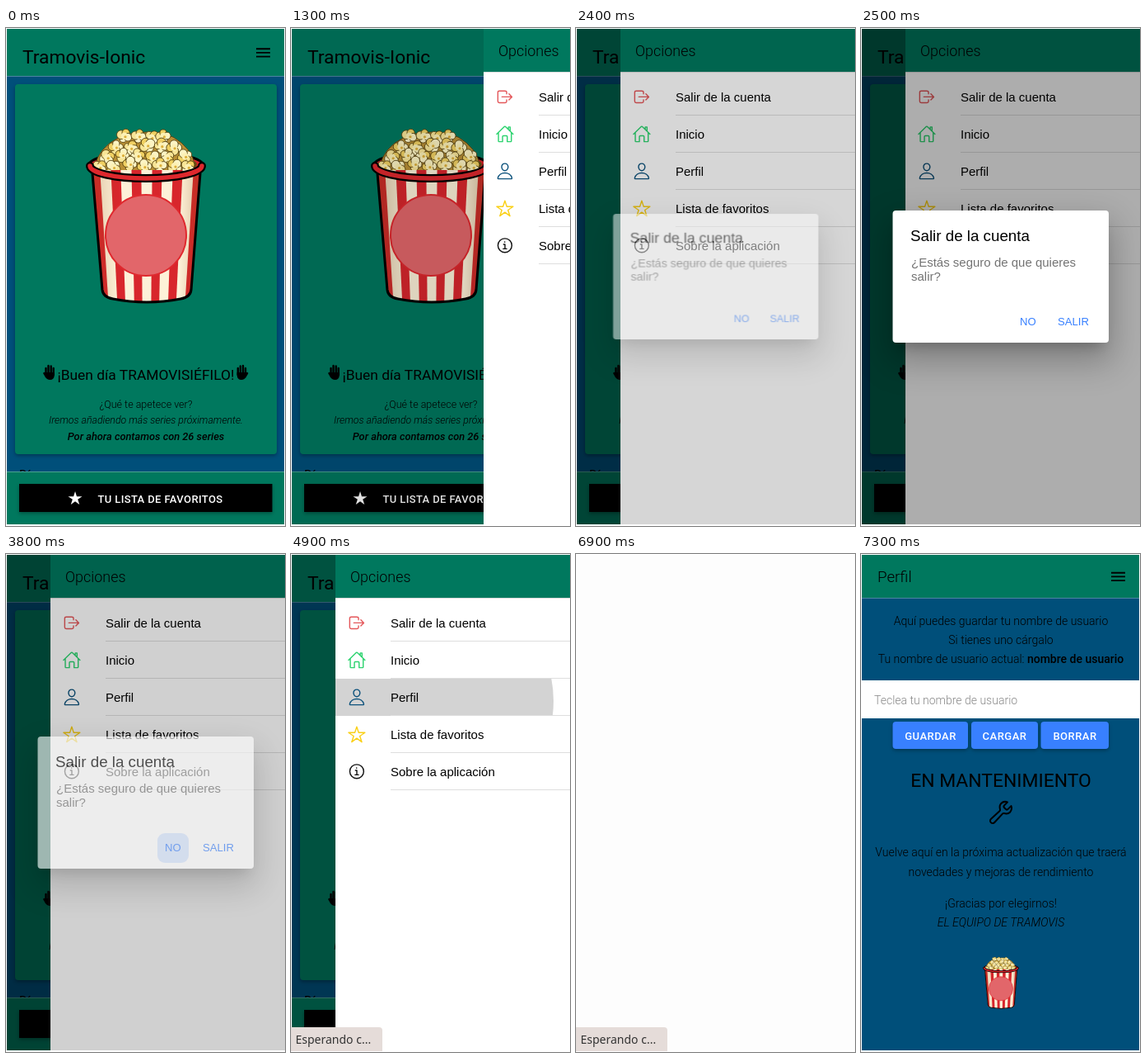
Recreate the animation shown at these times as an HTML page. Size 339 px wide and 603 px high, loop 8000 ms.

```html
<!DOCTYPE html>
<html lang="es">
<head>
<meta charset="utf-8">
<title>Menú lateral</title>
<style>
html, body { margin: 0; width: 100%; height: 100%; overflow: hidden; background: #fff; }
svg { display: block; }
text { font-family: Roboto, "Open Sans", sans-serif; }
.ui text { font-family: "Liberation Sans", Arial, sans-serif; }
.mid { text-anchor: middle; }
.copy { font-size: 14px; font-weight: 300; }
.btn { font-size: 13px; font-weight: 500; letter-spacing: .5px; fill: #fff; }
.icon { fill: none; stroke-width: 32; stroke-linecap: round; stroke-linejoin: round; }
.raised { filter: drop-shadow(0 2px 2px rgba(0, 0, 0, .3)); }
.green { fill: #00785e; }
.blue { fill: #004f7a; }
.edge { fill: #fff; opacity: .3; }

.menu, .dim, .alert, .alertDim, .tap, .ripple, .blank, .profile, .status {
  animation: 8s step-end infinite;
}
.menu { animation-name: menu; }
.dim { animation-name: dim; }
.alert { animation-name: alert; transform-origin: 170px 301px; }
.alertDim { animation-name: alertDim; }
.tap { animation-name: tap; }
.ripple { animation-name: ripple; }
.blank { animation-name: blank; }
.profile { animation-name: profile; }
.status { animation-name: status; }

@keyframes menu {
  0% { transform: translateX(300px); }
  16.25% { transform: translateX(180px); }
  17.5% { transform: translateX(57px); }
  18.75% { transform: translateX(6px); }
  20%, 100% { transform: none; }
}
@keyframes dim {
  0% { opacity: 0; }
  16.25% { opacity: .12; }
  17.5% { opacity: .26; }
  18.75% { opacity: .31; }
  20%, 100% { opacity: .32; }
}
@keyframes alert {
  0% { opacity: 0; transform: scale(.9); }
  30% { opacity: .5; transform: scale(.95); }
  31.25% { opacity: 1; transform: none; }
  47.5% { opacity: .62; transform: none; }
  48.75%, 100% { opacity: 0; transform: none; }
}
@keyframes alertDim {
  0% { opacity: 0; }
  30% { opacity: .16; }
  31.25% { opacity: .32; }
  47.5% { opacity: .185; }
  48.75%, 100% { opacity: 0; }
}
@keyframes tap {
  0% { opacity: 0; }
  47.5%, 100% { opacity: .2; }
}
@keyframes ripple {
  0% { r: 0; }
  61.25% { r: 139px; }
  62.5%, 100% { r: 200px; }
}
@keyframes blank {
  0% { opacity: 0; }
  70%, 100% { opacity: 1; }
}
@keyframes profile {
  0% { opacity: 0; transform: none; }
  90% { opacity: .6; transform: translateY(8px); }
  91.25%, 100% { opacity: 1; transform: none; }
}
@keyframes status {
  0% { opacity: 0; }
  61.25% { opacity: 1; }
  78.75% { opacity: .75; }
  80% { opacity: .5; }
  81.25% { opacity: .25; }
  82.5% { opacity: 0; }
  86.25% { opacity: 1; }
  91.25%, 100% { opacity: 0; }
}
</style>
</head>
<body>
<svg width="339" height="603" viewBox="0 0 339 603">
  <defs>
    <clipPath id="screen"><rect x="1" y="1" width="338" height="600"/></clipPath>
    <clipPath id="page"><rect x="1" y="1" width="337" height="600"/></clipPath>
    <clipPath id="row"><rect x="54" y="151" width="285" height="45"/></clipPath>
    <clipPath id="cup"><path d="M104 172L117 317Q118 326 130 328Q171 336 212 328Q224 326 225 317L237 172Z"/></clipPath>
    <linearGradient id="shade">
      <stop offset="0" stop-color="#8a4a10" stop-opacity=".25"/>
      <stop offset=".25" stop-color="#8a4a10" stop-opacity="0"/>
      <stop offset=".8" stop-color="#8a4a10" stop-opacity="0"/>
      <stop offset="1" stop-color="#8a4a10" stop-opacity=".3"/>
    </linearGradient>
    <filter id="soft" x="-30%" y="-50%" width="160%" height="200%"><feGaussianBlur stdDeviation="7.5"/></filter>
    <filter id="softer" x="-30%" y="-50%" width="160%" height="200%"><feGaussianBlur stdDeviation="20"/></filter>

    <path id="star" d="M480 208H308L256 48l-52 160H32l140 96-54 160 138-100 138 100-54-160z"/>
    <path id="burger" d="M0 0h17M0 4.7h17M0 9.4h17" stroke="#000" stroke-width="1.9" fill="none"/>
    <g id="hand" stroke="#000" stroke-linecap="round" fill="none">
      <path d="M-4 -5V2M-1 -8V2M2.2 -7.5V2M5.2 -5V3" stroke-width="2.4"/>
      <path d="M-6 1L-3.5 5" stroke-width="2.6"/>
      <path d="M-5.2 0H6.4V3Q6 9 1 9Q-3 9 -5 5Z" fill="#000" stroke="none"/>
    </g>

    <g id="tub">
      <ellipse cx="170" cy="167" rx="70" ry="17" fill="#d8232a" stroke="#000" stroke-width="3"/>
      <ellipse cx="170" cy="165" rx="62" ry="12" fill="#6b4a12"/>
      <g id="corn" stroke="#54400f" stroke-width=".9"></g>
      <g clip-path="url(#cup)">
        <rect x="100" y="165" width="140" height="170" fill="#fdf1d8"/>
        <g id="stripes" fill="#d8262c"></g>
        <rect x="104" y="165" width="133" height="170" fill="url(#shade)"/>
      </g>
      <path d="M105 176L117 317Q118 326 130 328Q171 336 212 328Q224 326 225 317L236 176" fill="none" stroke="#000" stroke-width="3"/>
      <path d="M102 167A68 15 0 0 0 238 167" fill="none" stroke="#000" stroke-width="10" stroke-linecap="round"/>
      <path d="M102 167A68 15 0 0 0 238 167" fill="none" stroke="#de282d" stroke-width="5.5" stroke-linecap="round"/>
      <circle cx="170" cy="251" r="49" fill="#e2666a" stroke="#e0282e" stroke-width="2"/>
    </g>
  </defs>

  <g clip-path="url(#screen)">
    <g clip-path="url(#page)">
      <rect class="blue" width="339" height="603"/>
      <rect class="green" width="339" height="58"/>
      <rect class="edge" y="58" width="339" height="1"/>
      <text x="20" y="42.500" font-size="22.8">Tramovis-Ionic</text>
      <use href="#burger" x="304" y="25.200"/>
      <rect class="green raised" x="11" y="68" width="318" height="448" rx="4"/>
      <use href="#tub"/>
      <use href="#hand" transform="translate(52.5 417)"/>
      <use href="#hand" transform="translate(287 417) scale(-1 1)"/>
      <g class="mid">
        <text x="170" y="426" font-size="17.4">¡Buen día TRAMOVISIÉFILO!</text>
        <text x="170" y="460" font-size="12.5" font-weight="300">¿Qué te apetece ver?</text>
        <text x="170" y="479" font-size="12.300" font-weight="300" font-style="italic">Iremos añadiendo más series próximamente.</text>
        <text x="170" y="498.500" font-size="12.800" font-weight="500" font-style="italic">Por ahora contamos con 26 series</text>
      </g>
      <text x="16" y="546" font-size="15">Día</text>
      <rect class="green" y="537" width="339" height="66"/>
      <rect class="edge" y="537" width="339" height="1"/>
      <rect class="raised" x="16" y="552" width="307.500" height="34"/>
      <use href="#star" transform="translate(74.300 559.300) scale(.038)" fill="#fff"/>
      <text class="btn mid" x="187.500" y="574.500" style="letter-spacing:.4px">TU LISTA DE FAVORITOS</text>
    </g>

    <rect class="dim" width="339" height="603"/>

    <g class="menu">
      <rect x="54" width="285" height="603" fill="#fff"/>
      <rect class="green" x="54" width="285" height="53"/>
      <rect x="54" y="53" width="285" height="1" fill="#000" opacity=".15"/>
      <text x="72" y="34" font-size="17.900" font-weight="300">Opciones</text>
      <circle class="ripple" cx="180" cy="178" fill="#d3d3d3" clip-path="url(#row)"/>
      <g class="ui" id="items" font-size="15"></g>
    </g>

    <rect class="alertDim" width="339" height="603"/>

    <g class="alert ui">
      <rect x="33" y="234" width="273" height="171" rx="6" opacity=".26" filter="url(#softer)"/>
      <rect x="45" y="238" width="249" height="147" rx="4" opacity=".2" filter="url(#soft)"/>
      <rect x="38.500" y="221" width="262.500" height="160" rx="4" fill="#fff"/>
      <text x="60" y="257.500" font-size="18.750">Salir de la cuenta</text>
      <g font-size="15" fill="#737373">
        <text x="61" y="289">¿Estás seguro de que quieres</text>
        <text x="61" y="306">salir?</text>
      </g>
      <rect class="tap" x="184" y="338" width="38" height="36" rx="9" fill="#3880ff"/>
      <g font-size="13.125" fill="#3880ff">
        <text x="193" y="359.500">NO</text>
        <text x="239" y="359.500">SALIR</text>
      </g>
    </g>

    <rect class="blank" width="339" height="603" fill="#fdfdfd"/>

    <g clip-path="url(#page)">
    <g class="profile">
      <rect class="blue" width="339" height="603"/>
      <rect class="green" width="339" height="53"/>
      <rect class="edge" y="53" width="339" height="1"/>
      <text x="20" y="34" font-size="18.700" font-weight="300">Perfil</text>
      <use href="#burger" x="304" y="22.700"/>
      <g class="mid copy">
        <text x="170" y="86">Aquí puedes guardar tu nombre de usuario</text>
        <text x="170" y="109">Si tienes uno cárgalo</text>
        <text x="170" y="132">Tu nombre de usuario actual: <tspan font-weight="500">nombre de usuario</tspan></text>
        <text x="170" y="366">Vuelve aquí en la próxima actualización que traerá</text>
        <text x="170" y="390">novedades y mejoras de rendimiento</text>
        <text x="170" y="428">¡Gracias por elegirnos!</text>
        <text x="170" y="451" font-style="italic">EL EQUIPO DE TRAMOVIS</text>
      </g>
      <rect y="153" width="339" height="46" fill="#fff"/>
      <text class="copy" x="16" y="182" fill="#888">Teclea tu nombre de usuario</text>
      <g class="raised" fill="#3880ff">
        <rect x="38.500" y="203" width="91.500" height="33" rx="4"/>
        <rect x="134" y="203" width="81" height="33" rx="4"/>
        <rect x="218.500" y="203" width="82.500" height="33" rx="4"/>
      </g>
      <g class="mid">
        <text class="btn" x="84.500" y="225">GUARDAR</text>
        <text class="btn" x="174.500" y="225">CARGAR</text>
        <text class="btn" x="260" y="225">BORRAR</text>
        <text x="170" y="282" font-size="22.900">EN MANTENIMIENTO</text>
      </g>
      <path class="icon" stroke="#000" transform="translate(154 297) scale(.0625)" d="M393.87 190a32.1 32.1 0 01-45.25 0l-26.57-26.57a32.09 32.09 0 010-45.26L382.19 58a1 1 0 00-.3-1.64c-38.82-16.64-89.15-8.16-121.11 23.57-30.58 30.35-32.32 76-21.12 115.84a31.93 31.93 0 01-9.06 32.08L64 380a48.17 48.17 0 1068 68l153.86-167a31.93 31.93 0 0131.6-9.13c39.54 10.59 84.54 8.6 114.72-21.19 32.49-32 39.5-88.56 23.75-120.93a1 1 0 00-1.6-.26z"/>
      <use href="#tub" transform="translate(119.300 451.500) scale(.298)"/>
    </g>
    </g>
  </g>

  <g class="status">
    <path d="M0 573H107Q111 573 111 577V602H0Z" fill="#e5dcd9"/>
    <text x="5.500" y="593" font-size="14" fill="#333" style="font-family:'Noto Sans','Open Sans',sans-serif">Esperando c...</text>
  </g>
</svg>
<script>
const byId = id => document.getElementById(id);

const items = [
  ['Salir de la cuenta', '#e4575a', 'M304 336v40a40 40 0 01-40 40H104a40 40 0 01-40-40V136a40 40 0 0140-40h152c22 0 48 18 48 40v40M368 336l80-80-80-80M176 256h256'],
  ['Inicio', '#2dd36f', 'M80 212v236a16 16 0 0016 16h96V328a24 24 0 0124-24h80a24 24 0 0124 24v136h96a16 16 0 0016-16V212M480 256L267 52c-5-5-17-5-22 0L32 256M400 179V64h-48v69'],
  ['Perfil', '#0d527c', 'M344 144c-4 53-44 96-88 96s-84-43-88-96c-4-55 35-96 88-96s92 42 88 96zM256 304c-87 0-175 48-192 139-2 11 4 21 16 21h352c11 0 18-10 16-21C431 352 343 304 256 304z'],
  ['Lista de favoritos', '#fad017', 'M480 208H308L256 48l-52 160H32l140 96-54 160 138-100 138 100-54-160z'],
  ['Sobre la aplicación', '#111', 'M256 64a190 190 0 100 380 190 190 0 100-380zM220 224h38v120M210 346h94M252 156v6']
];
byId('items').innerHTML = items.map(([label, color, d], i) => {
  const y = 83.5 + 45 * i;
  return `<path class="icon" stroke="${color}" transform="translate(68.500 ${y - 11.5}) scale(.0445)" d="${d}"/>
    <text x="121" y="${y + 5.5}">${label}</text>
    <rect x="121" y="${y + 21.5}" width="218" height="1" fill="#dedede"/>`;
}).join('');

// Stripes narrow towards the bottom of the cup.
byId('stripes').innerHTML = [-2.5, -1.5, -.5, .5, 1.5, 2.5].map(k => {
  const x = k * 25.3, at = (v, s) => 171 + v * s;
  return `<path d="M${at(x - 6, 1)} 165L${at(x + 6, 1)} 165L${at(x + 6, .81)} 336L${at(x - 6, .81)} 336Z"/>`;
}).join('');

let seed = 11;
const rnd = () => (seed = seed * 16807 % 2147483647) / 2147483647;
const tones = ['#fdf4c4', '#f8e596', '#f0d062'];

function kernel(x, y) {
  const turn = rnd() * 6.28;
  let out = '';
  for (let k = 0; k < 4; k++) {
    const a = turn + k * 1.57;
    out += `<circle cx="${x + 4.4 * Math.cos(a)}" cy="${y + 4 * Math.sin(a)}" r="${4 + rnd() * 1.6}" fill="${tones[k % 3]}"/>`;
  }
  return out + `<circle cx="${x}" cy="${y}" r="4.200" fill="#fcf0b4" stroke="none"/>` +
    `<circle cx="${x + 1}" cy="${y + 1}" r="1.600" fill="#dcae3a" stroke="none"/>`;
}

let corn = '<path d="M108 168Q112 145 138 132Q170 120 203 132Q226 145 230 168Q170 190 108 168Z" fill="#b98f35"/>';
for (let row = 0; row < 4; row++) {
  const half = 54 * Math.sqrt((row + .6) / 3.6), n = 3 + row;
  for (let k = 0; k <= n; k++) {
    corn += kernel(169 + half * (2 * k / n - 1) + rnd() * 6 - 3, 131 + row * 12 + rnd() * 5 - 2.5);
  }
}
byId('corn').innerHTML = corn;
</script>
</body>
</html>
```
